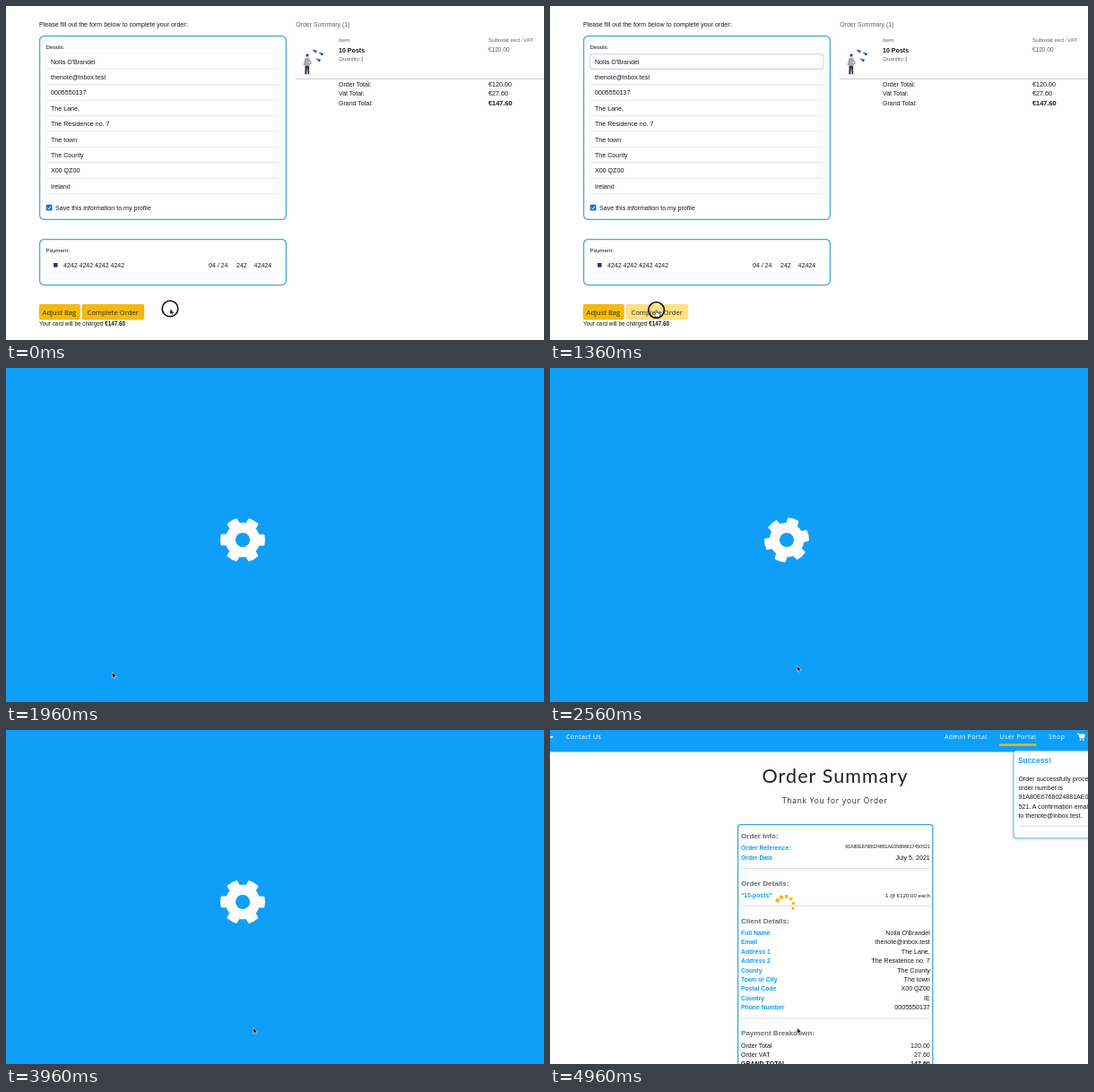
These frames come from a looping animation (600 by 373 pixels, 5 s). An HTML page:

```html
<!DOCTYPE html>
<html lang="en">
<head>
<meta charset="utf-8">
<title>Checkout</title>
<style>
html, body { margin: 0; width: 100%; height: 100%; overflow: hidden; background: #fefefe; }
svg { display: block; width: 100vw; height: 100vh; }
text { font-family: "Liberation Sans", Arial, sans-serif; white-space: pre; }
.open { font-family: "Open Sans", sans-serif; }
.title { font-family: Lato, sans-serif; }
</style>
</head>
<body>
<svg id="stage" viewBox="0 0 600 373" preserveAspectRatio="none"></svg>
<script>
const LOOP = 5000;
const BLUE = '#109ff8', YELLOW = '#f2b90f', INK = '#16181b', GREY = '#5d6166';
const NAME = "Nolla O'Brandel", MAIL = 'thenote@inbox.test', PHONE = '0005550137';
const ROAD = 'The Lane,', FLAT = 'The Residence no. 7', POST = 'X00 QZ00';

// ---- helpers ----
const text = (x, y, s, size = 7.1, fill = INK, more = '') =>
  `<text x="${x}" y="${y}" font-size="${size}" fill="${fill}" ${more}>${s}</text>`;
const rect = (x, y, w, h, fill, more = '') =>
  `<rect x="${x}" y="${y}" width="${w}" height="${h}" fill="${fill}" ${more}/>`;
const line = (x1, y, x2, stroke, w = 0.7) =>
  `<path d="M${x1} ${y}H${x2}" stroke="${stroke}" stroke-width="${w}"/>`;
const BOLD = 'font-weight="700"', END = 'text-anchor="end"';
const clamp = v => Math.min(1, Math.max(0, v));
const span = (t, a, b) => clamp((t - a) / (b - a));
const smooth = p => p * p * (3 - 2 * p);
const swing = p => 0.5 - Math.cos(Math.PI * p) / 2;
const mix = (a, b, p) => a + (b - a) * p;

// ---- checkout page ----
function field(value, i) {
  const y = 53.7 + i * 17.4 + (i === 8 ? 0.6 : 0);
  return rect(44.6, y, 260.4, 16.4, '#fefefe', 'rx="1.6" stroke="#eff0f2" stroke-width=".6"')
    + line(46, y + 16.5, 304, '#e0e3e6', 0.6)
    + text(50, y + 10.9, value);
}

function panel(y, h, label) {
  return rect(37.6, y, 274.8, h, 'none', 'rx="5" stroke="#41a8de" stroke-width="1.3"')
    + text(44.6, y + 14.2, label, 6.25);
}

function person() {
  const bird = (x, y) => `<g transform="translate(${x} ${y})">
    <path d="M-3 -1.4L0 -1.8L3 .4L.4 1.8Z" fill="#4f8fd0"/><path d="M-.4 .2L2.6 -.6L1.4 2Z" fill="#27364d"/></g>`;
  return `<ellipse cx="336" cy="76.3" rx="4.5" ry=".7" fill="#dcdcdf"/>
    <path d="M333.6 65H338L338.2 76H336.6L336 68L335.2 76H333.4Z" fill="#2c2f3c"/>
    <path d="M333.4 58.6Q336 57 338.3 58.6L338.6 67H333Z" fill="#a9abb4"/>
    <path d="M338 59.5L340.4 64L337.5 65.5M333.7 59.5L332.4 66" fill="none" stroke="#898c97"/>
    <circle cx="336" cy="56" r="1.6" fill="#c99a86"/>
    <path d="M334.3 56Q334.2 53.8 336.2 53.8T337.8 55.2L335.6 55.4Z" fill="#23232b"/>`
    + bird(344, 50.3) + bird(351.4, 53.4) + bird(348.2, 60.2);
}

const fields = [NAME, MAIL, PHONE, ROAD, FLAT, 'The town', 'The County', POST, 'Ireland'];

const checkout = `
  ${rect(0, 0, 600, 373, '#fefefe')}
  ${text(37, 23.4, 'Please fill out the form below to complete your order:')}
  <g id="form">
    ${panel(33.6, 204.8, 'Details:')}
    ${fields.map(field).join('')}
    <rect id="focus" x="44.8" y="53.9" width="260.2" height="16.4" rx="1.8" fill="none" stroke="#a9b8f5" stroke-width=".9"/>
    ${rect(44.7, 221.8, 6.8, 6.8, '#0b72e4', 'rx="1.4"')}
    <path d="M46.3 225.3L47.7 226.8L50 223.6" fill="none" stroke="#fff" stroke-width="1"/>
    ${text(55, 227.8, 'Save this information to my profile')}
    ${panel(260.6, 51, 'Payment:')}
    ${line(45, 298, 305, '#eceef0', 0.6)}
    ${rect(53, 287, 4.6, 4.6, '#26337a')}
    ${text(64, 291.9, '4242 4242 4242 4242', 7)}
    ${text(226, 291.9, '04 / 24', 7)}
    ${text(257, 291.9, '242', 7)}
    ${text(276.6, 291.9, '42424', 7)}
    ${rect(36.8, 333, 46, 17.6, YELLOW, 'rx="2"')}
    ${text(40.6, 344.8, 'Adjust Bag', 7.6, '#2e2a18', 'class="open"')}
    <g id="pay">
      <rect id="payFill" x="84.6" y="333" width="69.6" height="17.6" rx="2" fill="${YELLOW}"/>
      ${text(90.4, 344.8, 'Complete Order', 7.65, '#2e2a18', 'class="open"')}
    </g>
    ${text(37, 357.4, 'Your card will be charged <tspan font-weight="700">€147.60</tspan>', 6.38)}
  </g>
  ${text(323.2, 23.4, 'Order Summary (1)', 7, GREY)}
  ${text(371, 40, 'Item', 6.2, GREY)}
  ${text(538, 40, 'Subtotal excl. VAT', 6.2, GREY)}
  ${person()}
  ${text(371, 51.7, '10 Posts', 7.1, INK, BOLD)}
  ${text(538, 51.2, '€120.00', 6.5, GREY)}
  ${text(371, 61.2, 'Quantity:1', 6.15, GREY)}
  ${line(323, 81.5, 600, '#c4c6c9', 0.9)}
  ${text(371, 89.8, 'Order Total:', 7)}
  ${text(538, 89.8, '€120.00', 7.2)}
  ${text(371, 100.3, 'Vat Total:', 7)}
  ${text(538, 100.3, '€27.60', 7.2)}
  ${text(371, 110.8, 'Grand Total:', 7)}
  ${text(538, 110.8, '€147.60', 7.4, INK, BOLD)}`;

// ---- loading overlay ----
const tooth = i => `<path transform="rotate(${i * 60})"
  d="M-6.4 -17V-23.2Q-6.4 -24.2 -5.4 -24.4A25 25 0 0 1 5.4 -24.4Q6.4 -24.2 6.4 -23.2V-17Z"/>`;
const overlay = `
  ${rect(0, 0, 600, 373, BLUE)}
  <g id="gear" fill="#fcfcfd">
    <circle r="19.3"/>${[0, 1, 2, 3, 4, 5].map(tooth).join('')}
    <circle r="8" fill="${BLUE}"/>
  </g>`;

// ---- confirmation page ----
const nav = (x, s) => text(x, 10.3, s, 7.1, '#fff', 'class="open" letter-spacing=".35"');
const head = (y, s) => text(213, y, s, 8.07, '#676b70', BOLD);
const row = (y, label, value, size = 7.1) =>
  text(213, y, label, 6.8, BLUE, BOLD) + text(423.8, y, value, size, INK, END);
const sum = (y, label, value, more = '') =>
  text(213, y, label, 7, INK, more) + text(423.8, y, value, 7.1, INK, END + ' ' + more);

const client = [['Full Name', NAME], ['Email', MAIL], ['Address 1', ROAD], ['Address 2', FLAT],
  ['County', 'The County'], ['Town or City', 'The town'], ['Postal Code', POST],
  ['Country', 'IE'], ['Phone Number', PHONE]];

const toastLines = ['Order successfully processed! Your', 'order number is',
  '91A80E6768024881AE05896617450', '521. A confirmation email will be sent', `to ${MAIL}.`];

const dot = i => {
  const a = (-148 + i * 34) * Math.PI / 180, s = 4.2 - i * 0.25;
  return rect(-s / 2, -s / 2, s, s, YELLOW,
    `rx="1" transform="translate(${9.6 * Math.cos(a)} ${9.6 * Math.sin(a)}) rotate(${-58 + i * 34})"`);
};

const summary = `
  ${rect(0, 0, 600, 373, '#fefefe')}
  ${rect(0, 0, 600, 24.5, BLUE)}
  <path d="M-1 7H4L1.8 9.4Z" fill="#fff"/>
  ${nav(18, 'Contact Us')}${nav(440, 'Admin Portal')}${nav(501.4, 'User Portal')}${nav(556, 'Shop')}
  ${rect(501, 15.4, 41.4, 2.4, YELLOW)}
  <path d="M588 4H589.6L591 9H595.4L596.4 5H590" fill="#fff" stroke="#fff" stroke-width=".9"/>
  <circle cx="591.5" cy="10.8" r=".9" fill="#fff"/><circle cx="595" cy="10.8" r=".9" fill="#fff"/>
  ${text(236.4, 58.8, 'Order Summary', 21.5, '#222', 'class="title" letter-spacing="1.1"')}
  ${text(259, 82.3, 'Thank You for your Order', 8.2, '#222', 'class="open" letter-spacing=".85"')}
  ${rect(209.6, 105.6, 217.2, 290, '#fefefe', 'rx="3" stroke="#36a9e0" stroke-width="1.3"')}
  ${head(121, 'Order Info:')}
  ${row(134.2, 'Order Reference:', '')}
  ${text(423.8, 132, '91A80E6768024881AE05896617450521', 5.2, INK, END)}
  ${row(144.7, 'Order Date', 'July 5, 2021')}
  ${line(213, 154.5, 424, '#d0d2d4')}
  ${head(173.5, 'Order Details:')}
  ${row(186.7, '"10-posts"', '1 @ €120.00 each', 6.1)}
  ${line(213, 196.5, 424, '#d0d2d4')}
  ${head(215.5, 'Client Details:')}
  ${client.map(([k, v], i) => row(229 + i * 10.38, k, v)).join('')}
  ${line(213, 322, 424, '#d0d2d4')}
  ${head(341, 'Payment Breakdown:')}
  ${sum(354.5, 'Order Total', '120.00')}
  ${sum(364.9, 'Order VAT', '27.60')}
  ${sum(375.2, 'GRAND TOTAL', '147.60', BOLD)}
  <g id="spinner">${[0, 1, 2, 3, 4, 5].map(dot).join('')}</g>
  <g id="toast">
    ${rect(514.8, 23, 120, 101, '#000', 'rx="4" opacity=".04"')}
    ${rect(515.8, 23, 120, 99.6, '#000', 'rx="4" opacity=".06"')}
    ${rect(517, 23.2, 120, 97.6, '#fefefe', 'rx="3" stroke="#5cc0ea" stroke-width="1"')}
    ${text(522, 36.7, 'Success!', 8.4, BLUE, BOLD)}
    ${toastLines.map((s, i) => text(522.4, 56.6 + i * 10.4, s)).join('')}
    ${line(522, 107.3, 600, '#d0d2d4')}
  </g>`;

// ---- pointer ----
const pointer = `
  <circle id="ring" r="8.8" fill="none" stroke="#0a0a0a" stroke-width="1.6"/>
  <path id="arrow" d="M0 0V6.6L1.5 5.3L2.5 7.6L3.6 7.1L2.6 4.9H4.6Z" fill="#0a0a0a" stroke="#fff" stroke-width=".55"/>
  <path id="hand" d="M-.7 .6Q0 -.4 .7 .6V3L3.6 3.7Q4.4 4 4.2 5L3.5 7.6H-.4L-2.6 4.6Q-2.2 3.6 -.7 4.6Z"
    fill="#fff" stroke="#222" stroke-width=".65"/>`;

document.getElementById('stage').innerHTML = `
  <g id="checkout">${checkout}</g><g id="overlay">${overlay}</g>
  <g id="summary">${summary}</g><g id="pointer">${pointer}</g>`;

const el = {};
document.querySelectorAll('[id]').forEach(n => el[n.id] = n);
const set = (id, key, value) => el[id].setAttribute(key, value);
const show = (id, on) => set(id, 'display', on ? 'inline' : 'none');

// pointer stops: start, end, x, y
const moves = [[120, 520, 111.6, 339.2], [760, 1080, 118.6, 339.6], [2000, 2570, 275.8, 332.4]];
const SUBMIT = 1480, PAGE = 4400;

function draw(t) {
  let x = 183, y = 338;
  for (const [a, b, nx, ny] of moves) {
    const p = smooth(span(t, a, b));
    x = mix(x, nx, p);
    y = mix(y, ny, p);
  }
  const onPay = t < SUBMIT && x > 84.6 && x < 154.2;
  const fade = swing(span(t, SUBMIT + 3, SUBMIT + 103));

  show('checkout', t < PAGE && fade < 1);
  show('overlay', t < PAGE && fade > 0);
  show('summary', t >= PAGE);

  set('form', 'opacity', 1 - fade);
  set('overlay', 'opacity', fade);
  set('focus', 'opacity', span(t, 200, 350) * (1 - span(t, 1320, 1440)));
  set('payFill', 'fill', onPay || t >= SUBMIT ? '#fde083' : YELLOW);
  set('pay', 'opacity', t >= SUBMIT ? 0.65 : 1);
  set('gear', 'transform', `translate(264 192) rotate(${(t - 1960) * 0.18 + 30})`);

  set('toast', 'opacity', span(t, 4520, 4670));
  set('spinner', 'transform', `translate(262 195.5) rotate(${(t - 4960) * 0.36})`);

  set('pointer', 'transform', `translate(${x} ${y})`);
  show('arrow', !onPay);
  show('hand', onPay);
  show('ring', t < 120 || (t >= 1340 && t < SUBMIT));
}

function tick() {
  draw(performance.now() % LOOP);
  requestAnimationFrame(tick);
}
tick();
</script>
</body>
</html>
```
